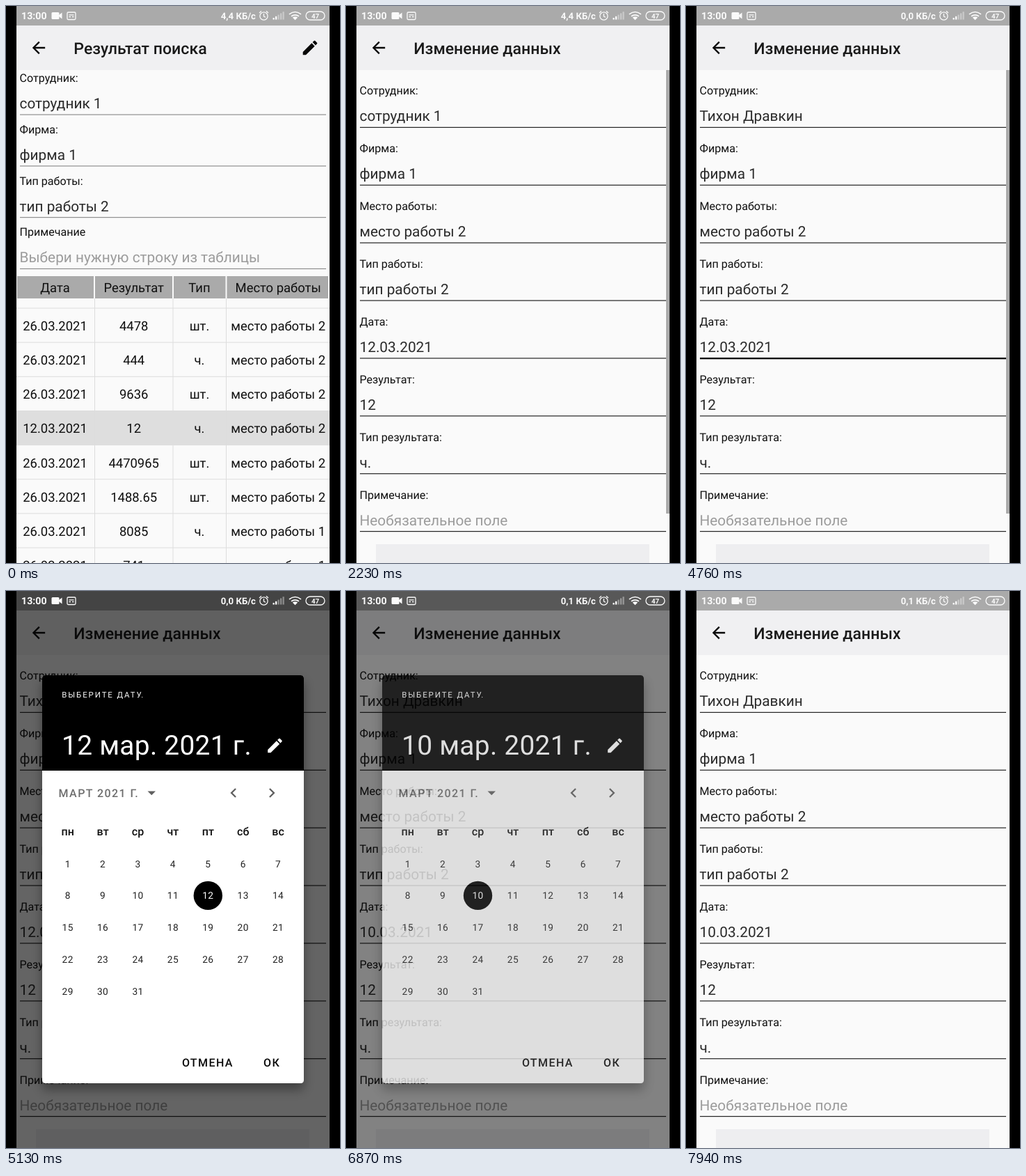
Write an HTML page that moves like this. It is 480 px wide and 800 px high and loops after 7990 ms.

```html
<!DOCTYPE html>
<html lang="ru">
<head>
<meta charset="utf-8">
<style>
html, body { margin: 0; width: 100%; height: 100%; overflow: hidden; background: #000; }
svg { display: block; width: 100vw; height: 100vh; font-family: Roboto, sans-serif; text-rendering: geometricPrecision; }
</style>
</head>
<body>
<svg id="stage" viewBox="0 0 480 800" preserveAspectRatio="none"></svg>
<script>
const LOOP = 7990;
const PAPER = '#fafafa', BAR = '#f0f0f2', GREY = '#aaaaaa', INK = '#101010', FIELD = '#2b2b2b', HINT = '#9c9c9c', RULE = '#dddddd', LIGHT = '#fafafa';
const SMALL = 16.1, CELL = 18.45, INPUT = 20.8, TITLE = 23.05;
const PERSON = 'Тихон Дравкин';
const STAFF = ['сотрудник 1', 'второй сотр', 'сотрудник 3', 'сотрудник 4', 'сотрудник 5', 'Егор Лумянин', PERSON, 'Ростислав Мурев'];
const ICONS = {
  back: 'M20 11H7.83l5.59-5.59L12 4l-8 8 8 8 1.41-1.41L7.83 13H20z',
  edit: 'M3 17.25V21h3.75L17.81 9.94l-3.75-3.75zM20.71 7.04c.39-.39.39-1.02 0-1.41l-2.34-2.34c-.39-.39-1.02-.39-1.41 0l-1.83 1.83 3.75 3.75z',
  search: 'M15.5 14h-.79l-.28-.27C15.41 12.59 16 11.11 16 9.5 16 5.91 13.09 3 9.5 3S3 5.91 3 9.5 5.91 16 9.5 16c1.61 0 3.09-.59 4.23-1.57l.27.28v.79l5 4.99L20.49 19zm-6 0C7.01 14 5 11.99 5 9.5S7.01 5 9.5 5 14 7.01 14 9.5 11.99 14 9.5 14z',
  prev: 'M15.41 7.41L14 6l-6 6 6 6 1.41-1.41L10.83 12z',
  next: 'M10 6L8.59 7.41 13.17 12l-4.58 4.59L10 18l6-6z'
};

const rect = (x, y, w, h, fill, more = '') => `<rect x="${x}" y="${y}" width="${w}" height="${h}" fill="${fill}" ${more}/>`;
const text = (x, y, size, str, fill = INK, more = '') => `<text x="${x}" y="${y}" font-size="${size}" fill="${fill}" ${more}>${str}</text>`;
const centered = (x, y, size, str, fill, more = '') => text(x, y, size, str, fill, 'text-anchor="middle" ' + more);
const icon = (name, x, y, fill = '#080808') => `<path d="${ICONS[name]}" fill="${fill}" transform="translate(${x - 13.74} ${y - 13.74}) scale(1.145)"/>`;
const group = (id, body, more = '') => `<g id="${id}" ${more}>${body}</g>`;

const page = (title, action) =>
  rect(15, 28, 450, 772, PAPER) + rect(15, 28, 450, 64, BAR) + icon('back', 47, 60) +
  text(97.3, 69, TITLE, title, '#1a1a1a', 'font-weight="500"') + (action ? icon(action, 437, 60) : '');

function field(y, label, value, line, hint, id = '') {
  return text(19.5, y, SMALL, label) +
    text(19.5, y + 38, INPUT, value, hint ? HINT : FIELD, id && `id="${id}"`) +
    rect(20, y + 46.5, 440, 1.1, line);
}

function results() {
  const labels = ['Сотрудник:', 'Фирма:', 'Тип работы:', 'Примечание'];
  const values = ['сотрудник 1', 'фирма 1', 'тип работы 2', 'Выбери нужную строку из таблицы'];
  const heads = ['Дата', 'Результат', 'Тип', 'Место работы'];
  const amounts = ['4478', '444', '9636', '12', '4470965', '1488.65', '8085', '741'];
  const mid = [70.5, 183.7, 278, 391.2];
  const edges = [16, 128, 241, 317.5, 465];
  let s = page('Результат поиска', 'edit');
  labels.forEach((l, i) => s += field(109 + i * 73.8, l, values[i], '#868686', i === 3));
  heads.forEach((h, i) => s += rect(edges[i], 388, edges[i + 1] - edges[i] - 2, 32, GREY) + centered(mid[i], 411, CELL, h, INK));
  amounts.forEach((a, i) => {
    const y = 434 + i * 49.15;
    if (i === 3) s += rect(15, y, 450, 49.15, '#dedede');
    const cells = [(i === 3 ? '12' : '26') + '.03.2021', a, [1, 3, 6].includes(i) ? 'ч.' : 'шт.', 'место работы ' + (i < 6 ? 2 : 1)];
    cells.forEach((c, k) => s += centered(mid[k], y + 32, CELL, c, INK));
    s += rect(15, y - .5, 450, 1, RULE);
  });
  [127, 239.5, 316].forEach(x => s += rect(x, 420, 1, 380, RULE));
  return s;
}

function staffList() {
  return page('Список сотрудников', 'search') + STAFF.map((n, i) => {
    const y = 118.5 + i * 65.4;
    return text(33.2, y, SMALL, n) + text(33.2, y + 23.6, SMALL, 'id: ' + (i + 1)) + rect(15, y + 37.4, 450, 1, RULE);
  }).join('');
}

function editForm() {
  const rows = [['Сотрудник:', ''], ['Фирма:', 'фирма 1'], ['Место работы:', 'место работы 2'], ['Тип работы:', 'тип работы 2'],
    ['Дата:', ''], ['Результат:', '12'], ['Тип результата:', 'ч.'], ['Примечание:', 'Необязательное поле']];
  const ids = { 0: 'person', 4: 'date' };
  return page('Изменение данных') +
    rows.map((r, i) => field(127.3 + i * 82.9, r[0], r[1], '#101010', i === 7, ids[i])).join('') +
    rect(20, 505, 440, 2.3, '#000', 'id="focus"') +
    rect(43, 773, 393, 27, '#eeeef0') +
    rect(460, 92, 5, 637, GREY, 'id="scrollbar"');
}

const dayX = i => 88.7 + (i % 7) * 50.4;
const dayY = i => 391.5 + Math.floor(i / 7) * 45.9;

function calendar() {
  const caps = 'font-weight="500" letter-spacing="1.43"';
  let s = rect(52, 121, 376, 586, '#fff', 'rx="4.5" filter="url(#shade)"') +
    '<path d="M52 258V125.500Q52 121 56.500 121H423.500Q428 121 428 125.500V258z"/>' +
    text(80.3, 153, 11.45, 'ВЫБЕРИТЕ ДАТУ.', LIGHT, 'letter-spacing="1.9"') +
    text(80, 235, 38.9, '', '#fff', 'id="headline" letter-spacing=".28"') +
    icon('edit', 386.5, 222, '#fff') +
    text(75.5, 296, 16, 'МАРТ 2021 Г.', '#6e6e6e', caps) +
    '<path d="M203.500 287.500h11.500l-5.750 5.750z" fill="#606060"/>' +
    icon('prev', 327, 290, '#606060') + icon('next', 382, 290, '#606060') +
    '<circle id="pick" cy="437.400" r="20.700"/>';
  'пн вт ср чт пт сб вс'.split(' ').forEach((d, i) => s += centered(dayX(i), 351, 16, d, INK, 'font-weight="500"'));
  for (let i = 0; i < 31; i++)
    s += centered(dayX(i), dayY(i) + 5, 13.7, i + 1, '#222', `id="day${i + 1}" letter-spacing=".4"`);
  return s + text(253, 683, 16, 'ОТМЕНА', '#0a0a0a', caps) + text(370, 683, 16, 'ОК', '#0a0a0a', caps);
}

function statusIcons() {
  const bold = 'font-weight="700"';
  let s = text(22, 19, 14.2, '13:00', LIGHT, bold) + text(359, 19, 13.2, '', LIGHT, `id="speed" text-anchor="end" ${bold}`);
  s += rect(65.5, 9, 11, 10, LIGHT, 'rx="1.5"') + `<path d="M76 13l4.500-3.500v9l-4.500-3.500z" fill="${LIGHT}"/>`;
  s += `<g fill="none" stroke="${LIGHT}" stroke-width="1.300">
    <rect x="88" y="9" width="12" height="10.500" rx="1.500"/><path d="M90.500 12.800h7M90.500 15.500h2.500M95 15.500h2.500"/>
    <circle cx="370.500" cy="14.500" r="5.600"/><path d="M370.500 11v3.800l2.500 1.500M364 10l3-2.800M377 10l-3-2.800"/>
    <rect x="431" y="8" width="27" height="12" rx="6"/></g>`;
  for (let i = 0; i < 5; i++) s += rect(383.5 + i * 3.5, 17 - i * 2.2, 2.3, 2.5 + i * 2.2, LIGHT, i > 1 ? 'opacity=".4"' : '');
  s += `<g fill="none" stroke="${LIGHT}" stroke-width="1.700"><path d="M407 11.800q8.500-6.600 17 0M410 14.800q5.500-4 11 0"/></g>
    <path d="M411.800 16.500q3.700-2.500 7.400 0l-3.700 3.700z" fill="${LIGHT}"/>`;
  return s + centered(444.5, 17.5, 9.8, '47', LIGHT, bold);
}

const stage = document.getElementById('stage');
stage.innerHTML =
  `<defs><clipPath id="screen"><rect x="15" width="450" height="800"/></clipPath>
   <filter id="shade" x="-10%" y="-10%" width="120%" height="120%"><feDropShadow dx="0" dy="9" stdDeviation="8" flood-opacity=".38"/></filter></defs>` +
  rect(0, 0, 480, 800, '#000') +
  group('app',
    rect(15, 0, 450, 28, GREY) + group('results', results()) + group('form', editForm()) + group('list', staffList()) +
    rect(15, 0, 450, 800, '#000', 'id="scrim"') + group('dialog', calendar()) + statusIcons(),
    'clip-path="url(#screen)"');

const el = id => document.getElementById(id);
const ramp = (t, from, len) => Math.min(1, Math.max(0, (t - from) / len));
const ease = p => 1 - (1 - p) * (1 - p);
const show = (id, opacity) => {
  el(id).style.display = opacity > 0 ? '' : 'none';
  el(id).setAttribute('opacity', opacity);
};

// Screen changes, in ms
const FORM = 1600, LIST = 2450, BACK = 3500, OPEN = 4850, PICK = 6000, CLOSE = 6840, FADE = 160;

function draw(t) {
  show('results', t < FORM + FADE ? 1 : 0);
  show('form', ramp(t, FORM, FADE));
  show('list', ramp(t, LIST, FADE) * (1 - ramp(t, BACK, FADE)));
  el('person').textContent = t < BACK ? STAFF[0] : PERSON;
  el('date').textContent = (t < CLOSE ? 12 : 10) + '.03.2021';
  show('focus', t > 4690 && t < OPEN + 100 ? 1 : 0);
  show('scrollbar', 1 - ramp(t, t < BACK ? FORM + 1300 : OPEN, 250));

  const open = ease(ramp(t, OPEN, 180));
  show('scrim', .6 * open * (1 - ease(ramp(t, CLOSE, 300))));
  show('dialog', open * (1 - ramp(t, CLOSE, 120)));
  const k = .9 + .1 * open;
  el('dialog').setAttribute('transform', `translate(${240 * (1 - k)} ${414 * (1 - k)}) scale(${k})`);

  const day = t < PICK ? 12 : 10;
  el('headline').textContent = day + ' мар. 2021 г.';
  el('pick').setAttribute('cx', dayX(day - 1));
  for (const d of [10, 12]) el('day' + d).setAttribute('fill', d === day ? '#fff' : '#222');
  el('speed').textContent = (t < 2400 ? '4,4' : t < 6150 ? '0,0' : '0,1') + ' КБ/с';
}

const start = performance.now();
function tick() {
  draw((performance.now() - start) % LOOP);
  requestAnimationFrame(tick);
}
tick();
</script>
</body>
</html>
```
